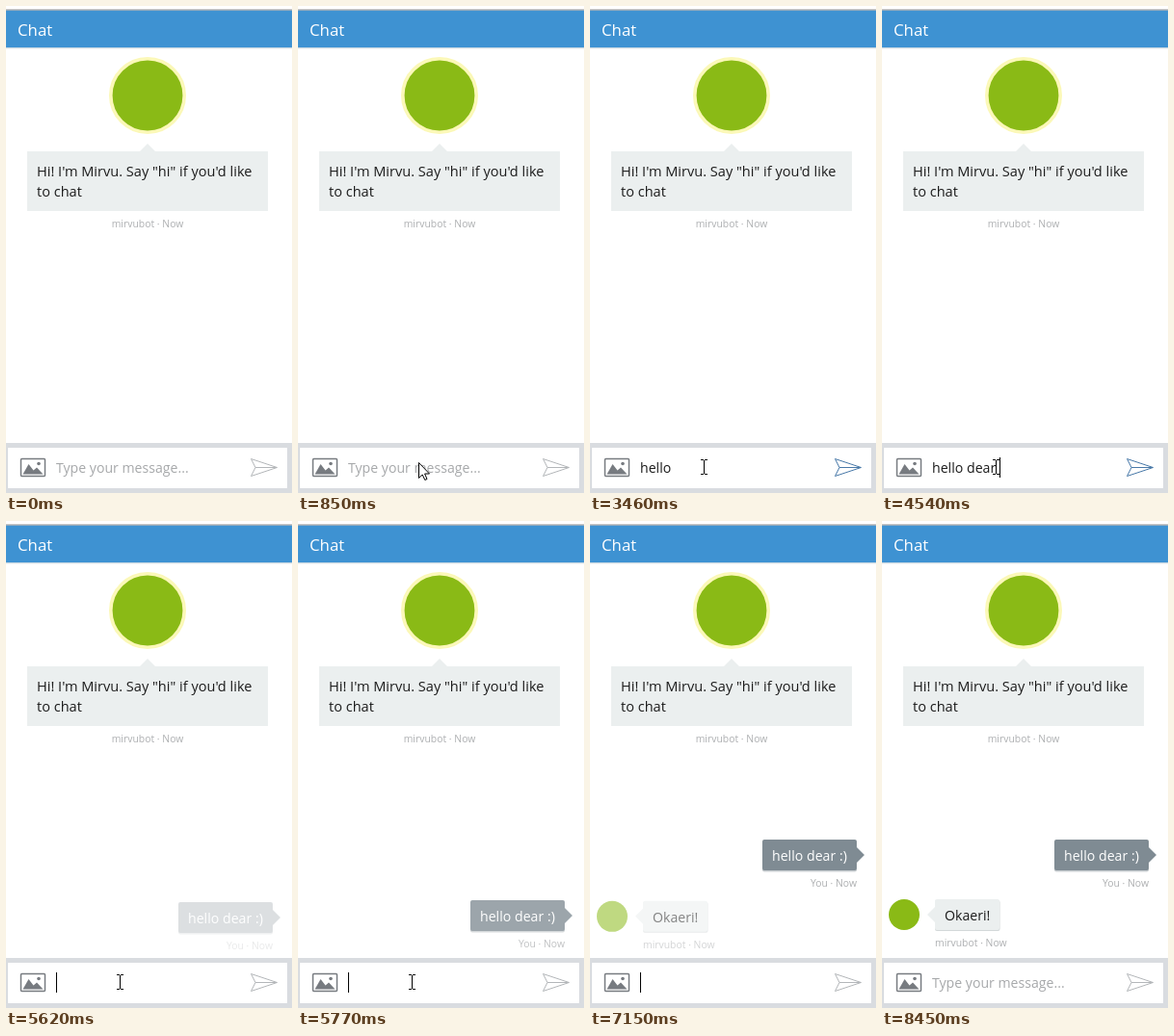
Recreate the animation shown at these times as an HTML page. Size 297x506 px, loop 8.53 s.

```html
<!DOCTYPE html>
<html lang="en">
<head>
<meta charset="utf-8">
<title>Chat</title>
<style>
  html, body { margin: 0; width: 100%; height: 100%; overflow: hidden; background: #fff; }
  svg { display: block; }
  text { font: 14.15px "Open Sans", "Noto Sans", sans-serif; fill: #1c1c1c; white-space: pre; }
  .title { font-size: 16.8px; font-weight: 500; fill: #fff; }
  .greeting { font-size: 14.55px; }
  .note { font-size: 10.4px; fill: #adafb1; }
  .hint { font-size: 14.1px; fill: #a6a8aa; }
  .crisp { shape-rendering: crispEdges; }
  .bot { fill: #ebefef; }
  .me { fill: #7f8b93; }
  .logo { fill: #8aba16; }
</style>
</head>
<body>
<svg width="297" height="506" viewBox="0 0 297 506">
  <g class="crisp">
    <rect y="3" width="297" height="1" fill="#c6c6c6"/>
    <rect y="4" width="297" height="1" fill="#8fa9bc"/>
    <rect y="5" width="297" height="38" fill="#3e92d2"/>
    <rect y="43" width="297" height="1" fill="#c9d8e3"/>
    <rect y="44" width="297" height="1" fill="#f1f4f6"/>
  </g>
  <text class="title" x="12" y="31">Chat</text>

  <circle class="logo" cx="147" cy="93" r="38.2" stroke="#fbf8b8" stroke-width="3.6"/>
  <path class="bot" d="M22 151H139L147 143L155 151H272V213H22Z"/>
  <text class="greeting" x="32" y="177">Hi! I'm Mirvu. Say "hi" if you'd like</text>
  <text class="greeting" x="32" y="198">to chat</text>
  <text class="note" x="147" y="230" text-anchor="middle">mirvubot · Now</text>

  <g id="sent">
    <rect x="179" y="394" width="98" height="32.5" rx="2" fill="#c9ced1"/>
    <rect class="me" x="179" y="393" width="98" height="32" rx="2"/>
    <path class="me" d="M277 401L285 409L277 417Z"/>
    <text x="189" y="415" style="fill:#fff">hello dear :)</text>
    <text class="note" x="277" y="442" text-anchor="end">You · Now</text>
  </g>

  <g id="reply">
    <circle class="logo" cx="23" cy="409" r="16"/>
    <rect x="55" y="394" width="67.5" height="32" rx="2" fill="#d3d8d9"/>
    <rect class="bot" x="55" y="393" width="67" height="32" rx="2"/>
    <path class="bot" d="M55 401L47 409L55 417Z"/>
    <text x="65" y="415">Okaeri!</text>
    <text class="note" x="55" y="442">mirvubot · Now</text>
  </g>

  <g class="crisp">
    <rect y="454" width="297" height="52" fill="#d9dce0"/>
    <rect x="2" y="459" width="290" height="42" fill="#fff"/>
  </g>
  <g fill="#777b80">
    <rect x="15.5" y="470.5" width="25" height="18" rx="1" fill="none" stroke="#777b80" stroke-width="1.5"/>
    <path d="M17.5 486.5L23.5 476L28.5 482.5L32 479.5L38.5 486.5Z"/>
    <circle cx="34" cy="475.5" r="1.8"/>
  </g>
  <path id="plane" d="M254.5 470.5L281.5 479.5L254.5 488.5L259 479.5ZM259 479.5H281" fill="none" stroke-linejoin="round"/>
  <text id="hint" class="hint" x="52" y="485">Type your message...</text>
  <text id="typed" x="52" y="485"></text>
  <rect id="caret" class="crisp" y="469" width="1" height="21"/>

  <path id="arrow" d="M.5 .5V16.5L4.2 13L6.8 18.5L9 17.5L6.6 12H11.5Z" fill="#fff" stroke="#000"/>
  <path id="beam" class="crisp" d="M-3 -8H0V-7H1V-8H4V-7H1V7H4V8H1V7H0V8H-3V7H0V-7H-3Z"/>
</svg>
<script>
const LOOP = 8530, STEP = 77, FADE = 300;
const SEND = 5540, REPLY = 6990, FOCUS = 1000, BLUR = 8450;
const message = "hello dear :)";
const keys = [2230, 2390, 2460, 2690, 2920, 3540, 3770, 3920, 4080, 4230, 4540, 4770, 5000];
const caretOn = [[FOCUS, 1540], [2080, 3460], [3540, 6380], [6840, 7840], [8370, BLUR]];

const [sent, reply, plane, hint, typed, caret, arrow, beam] =
  ["sent", "reply", "plane", "hint", "typed", "caret", "arrow", "beam"].map(id => document.getElementById(id));

const show = (el, on) => el.setAttribute("visibility", on ? "visible" : "hidden");
const move = (el, x, y) => el.setAttribute("transform", `translate(${x} ${y})`);
const ease = p => p * p * (3 - 2 * p);

// Fades a message in while it rises a few pixels.
function appear(el, age, lift) {
  const p = Math.min(1, Math.max(0, age / FADE));
  el.setAttribute("opacity", p);
  move(el, 0, 4 * (1 - p) - lift);
}

// The pointer advances in discrete steps; returns its place and shape.
function pointer(t) {
  if (t < 390 || t >= 6840) return null;
  if (t < FOCUS) {
    const p = Math.min(1, Math.floor((t - 390) / STEP) / 6);
    return { x: Math.round(208 - 90 * ease(p)), y: Math.round(483 - 4 * p - 12 * Math.sin(Math.PI * p)), shape: arrow };
  }
  if (t < 6380) return { x: 118, y: t < 1390 ? 480 : 479, shape: beam };
  const p = (Math.floor((t - 6380) / STEP) + 1) / 6;
  const y = Math.round(479 + 22 * p * p);
  return { x: Math.round(118 + 115 * p), y, shape: y < 495 ? beam : arrow };
}

function draw(t) {
  appear(sent, t - SEND, t < REPLY ? 0 : 62);
  appear(reply, t - REPLY, 0);

  const text = t < SEND ? message.slice(0, keys.filter(k => k <= t).length) : "";
  typed.textContent = text;
  plane.setAttribute("stroke", text ? "#4a7aa9" : "#b4b7ba");
  show(hint, t < FOCUS || t >= BLUR);
  show(caret, caretOn.some(([a, b]) => t >= a && t < b));
  caret.setAttribute("x", 52 + Math.round(text ? typed.getComputedTextLength() : 0));

  const mouse = pointer(t);
  for (const el of [arrow, beam]) show(el, mouse && mouse.shape === el);
  if (mouse) move(mouse.shape, mouse.x, mouse.y);
}

function frame() {
  draw(performance.now() % LOOP);
  requestAnimationFrame(frame);
}
frame();
</script>
</body>
</html>
```
